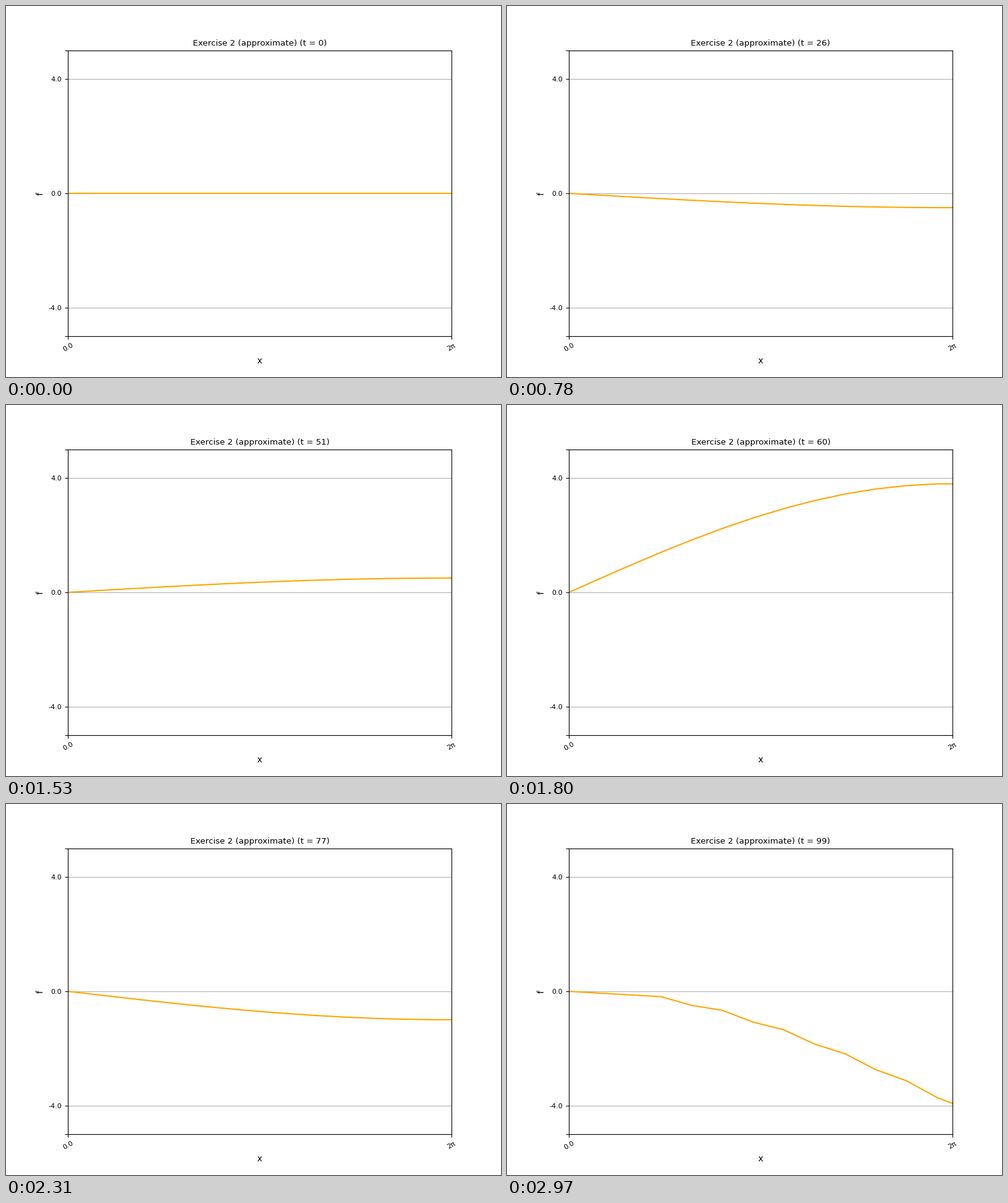
A matplotlib script for the animation above (3 s loop, 800 by 600 pixels).

```python
import numpy as np
import matplotlib.pyplot as plt
from matplotlib.animation import FuncAnimation

STEPS = 100
LENGTH = 16 * np.pi
CELLS = 100
AMPLITUDE = 4.0

dx = LENGTH / CELLS
x = dx * np.arange(CELLS + 2)  # one ghost node past the right wall


def solve():
    """Leapfrog wave equation with c*dt = dx: fixed left end, free right end."""
    f = np.zeros((STEPS, x.size))
    f[1] = AMPLITUDE * np.sin(dx / 4) * np.sin(x / 4)
    for n in range(1, STEPS - 1):
        f[n + 1, 1:-1] = f[n, 2:] + f[n, :-2] - f[n - 1, 1:-1]
        f[n + 1, -1] = f[n + 1, -3]
    return f


wave = solve()

plt.rcParams["font.family"] = "DejaVu Sans"
fig, ax = plt.subplots(figsize=(8, 6), dpi=100)
ax.set_xlim(0, 2 * np.pi)
ax.set_ylim(-5, 5)
ax.set_xticks([0, 2 * np.pi], ["0.0", "2π"], rotation=30, fontsize=8)
ax.set_yticks([-5, -4, 0, 4, 5], ["", "-4.0", "0.0", "4.0", ""], fontsize=8)
ax.grid(axis="y")
ax.set_xlabel("x", fontsize=10)
ax.set_ylabel("f", fontsize=10)
title = ax.set_title("", fontsize=9.6)
line, = ax.plot(x, wave[0], color="orange", lw=1.5)


def update(n):
    line.set_ydata(wave[n])
    title.set_text(f"Exercise 2 (approximate) (t = {n})")
    return line, title


anim = FuncAnimation(fig, update, frames=STEPS, interval=30, repeat=True,
                     repeat_delay=0, blit=False)
plt.show()
```
